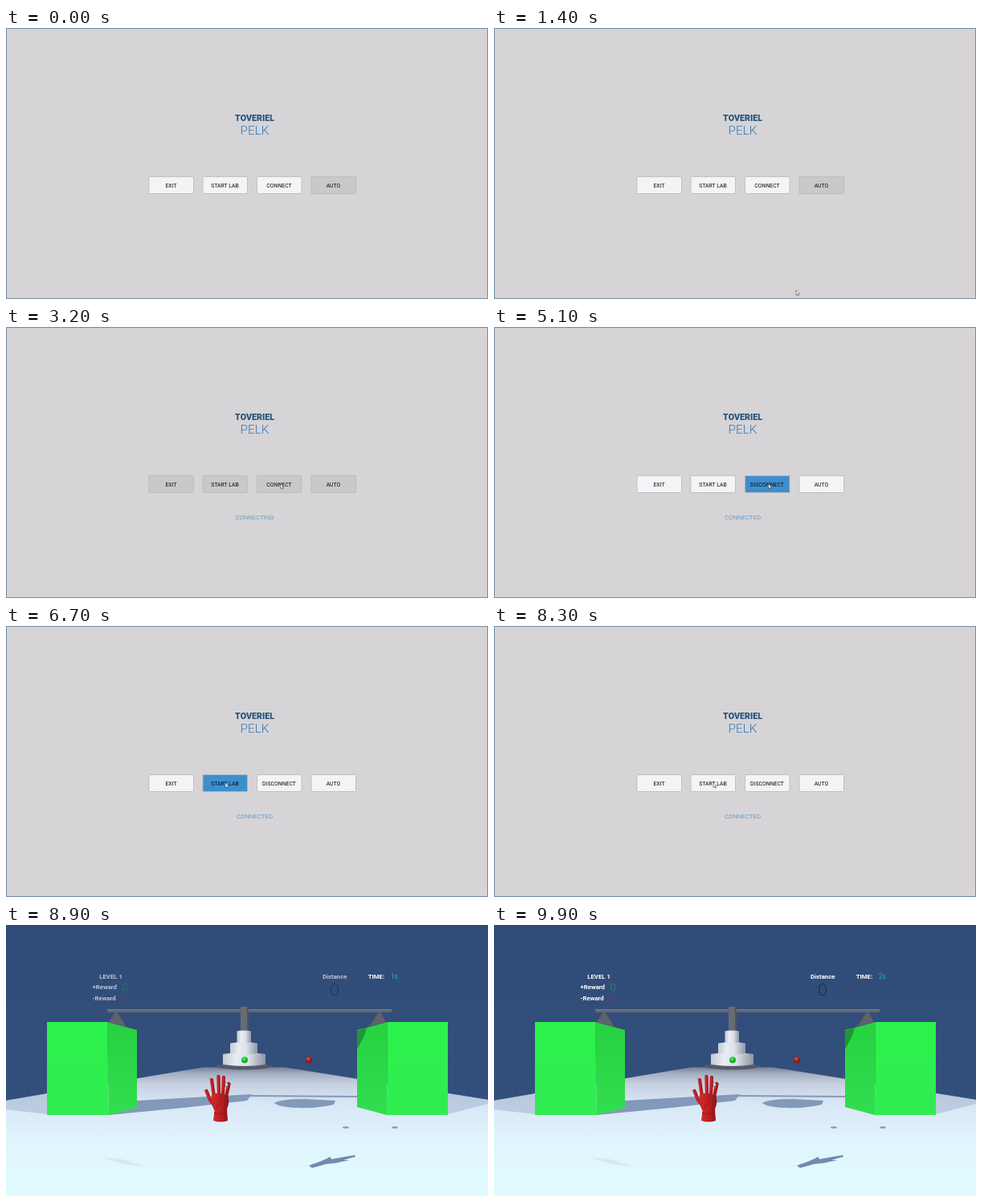
These frames come from a looping animation (600x338 px, 10000 ms). An HTML page:

```html
<!DOCTYPE html>
<html lang="en">
<head>
<meta charset="utf-8">
<title>Virtual lab</title>
<style>
html, body { margin: 0; height: 100%; overflow: hidden; background: #d6d4d6; }
svg { display: block; width: 100vw; height: 100vh; }
text { font-family: Roboto, Arial, sans-serif; }
.mid { text-anchor: middle; }
.button { font-size: 6.9px; fill: #0c0c0e; }
.label { font-size: 7.75px; font-weight: 700; fill: #fff; }
.thin { font-size: 13px; font-weight: 100; }
</style>
</head>
<body>
<svg viewBox="0 0 600 338">
  <defs>
    <linearGradient id="sky" x2="0" y2="1">
      <stop stop-color="#304b78"/><stop offset="1" stop-color="#34527f"/>
    </linearGradient>
    <linearGradient id="floor" gradientUnits="userSpaceOnUse" x1="0" y1="177" x2="0" y2="338">
      <stop stop-color="#727d96"/><stop offset=".05" stop-color="#a3adc0"/>
      <stop offset=".13" stop-color="#c6d0e0"/><stop offset=".28" stop-color="#d8e6f5"/>
      <stop offset=".55" stop-color="#e0f4fd"/><stop offset="1" stop-color="#e0fbff"/>
    </linearGradient>
    <linearGradient id="drum">
      <stop stop-color="#c3c9d3"/><stop offset=".3" stop-color="#e9edf2"/>
      <stop offset=".6" stop-color="#dde1e8"/><stop offset="1" stop-color="#8f96a4"/>
    </linearGradient>
    <linearGradient id="front" x2="0" y2="1">
      <stop stop-color="#2cf24c"/><stop offset="1" stop-color="#30ec52"/>
    </linearGradient>
    <linearGradient id="side" x2="0" y2="1">
      <stop stop-color="#27d140"/><stop offset="1" stop-color="#31de50"/>
    </linearGradient>
    <linearGradient id="skin">
      <stop stop-color="#d02a2c"/><stop offset=".5" stop-color="#bd1f23"/><stop offset="1" stop-color="#8c1218"/>
    </linearGradient>
    <radialGradient id="green" cx=".4" cy=".3"><stop stop-color="#3dff60"/><stop offset="1" stop-color="#0fae2c"/></radialGradient>
    <radialGradient id="red" cx=".4" cy=".3"><stop stop-color="#f04a40"/><stop offset="1" stop-color="#8e1414"/></radialGradient>
  </defs>

  <g id="menu">
    <rect width="600" height="338" fill="#d6d4d6"/>
    <rect x=".5" y=".5" width="599" height="337" fill="none" stroke="#7189a8"/>
    <g class="mid">
      <text x="309.5" y="115.6" font-size="10.7" font-weight="800" fill="#24527a">TOVERIEL</text>
      <text x="309.5" y="132.6" font-size="15.4" font-weight="300" fill="#3478b6">PELK</text>
      <g id="buttons"></g>
      <text id="status" x="309.6" y="240.2" font-size="7.75" font-weight="300" fill="#3a80c0"></text>
    </g>
  </g>

  <g id="scene">
    <rect width="600" height="338" fill="url(#sky)"/>
    <path d="M0 219L245 177.500H347L600 218V338H0Z" fill="url(#floor)"/>
    <path d="M0 219L51 210V236L0 230ZM550 210L600 218V223L550 236Z" fill="#a9bbd3" opacity=".6"/>
    <g fill="#8299b9">
      <path d="M128 237L163 219L306 211L300 219L230 227Z"/>
      <path d="M300 212L437 213V215L300 214Z"/>
      <path d="M334 222Q342 217 372 217L410 219L408 224Q388 229 362 228Q340 227 334 222Z"/>
      <ellipse cx="423" cy="252.500" rx="4" ry="1.200"/>
      <ellipse cx="484" cy="252.500" rx="4" ry="1.200"/>
    </g>
    <path d="M377 300L391 295L400 291L403 289L405 292L434 287L435 289L420 293L428 293L410 297L399 298L381 303Z" fill="#7089ad"/>
    <path d="M118 290L145 292L172 301L150 299Z" fill="#cfe0f0" opacity=".6"/>

    <ellipse cx="296" cy="176.500" rx="35" ry="4" fill="#555a66"/>
    <g fill="url(#drum)">
      <path d="M270 161Q296.500 157 323 161V174Q296.500 178 270 174Z"/>
      <path d="M279 147.500Q296 144 313 147.500V160Q296 163 279 160Z"/>
      <path d="M287.500 132.500Q296 130 305 132.500V146Q296 148.500 287.500 146Z"/>
    </g>
    <path d="M126 105H480V109H126Z" fill="#65676e"/>
    <path d="M126 105H480V106.300H126Z" fill="#777981"/>
    <path d="M292 102H300V131.500H292Z" fill="#696b72"/>
    <path d="M300 102L302 103V131H300Z" fill="#50525a"/>
    <path d="M137 107L128 121.500L150 127ZM465 107L451 126L473 121.500Z" fill="#5f626c"/>
    <path d="M137 107L147 121.500L150 127ZM465 107L456 122L451 126Z" fill="#4b4e59"/>

    <path d="M126 121L163 131V228L128 237Z" fill="url(#side)"/>
    <path d="M51 121H126L128 237H51Z" fill="url(#front)"/>
    <path d="M475 121L437 131V227L474 237Z" fill="url(#side)"/>
    <path d="M475 121H550V237H474Z" fill="url(#front)"/>
    <path d="M437 132L449 128L446 138L437 155Z" fill="#1c9636"/>
    <circle cx="297" cy="168.300" r="4" fill="url(#green)"/>
    <circle cx="377" cy="168.300" r="4" fill="url(#red)"/>

    <g fill="none" stroke-linecap="round" stroke-linejoin="round">
      <g stroke="#a91a1f" stroke-width="4.200">
        <path d="M259 214L256 193M265 212L264.500 189M270 212L271 190M274 215L277.500 198"/>
        <path d="M260 226L254 218L249.500 207"/>
      </g>
      <path d="M258.500 214L255.300 193M264.300 212L263.800 189M269.500 212L270.400 190M259 224L253 217L249 207" stroke="#cb2a2c" stroke-width="1.600"/>
    </g>
    <path d="M256 212Q266 207 276 213Q279 220 275 230L276 244Q267 247 258 244L259.500 232Q255 222 256 212Z" fill="url(#skin)"/>
    <path d="M259 234Q267 237 275 233M267 216Q266 224 262 229" fill="none" stroke="#8c1218" stroke-width=".8"/>

    <g id="hud">
      <text class="label" x="116.300" y="66.700">LEVEL 1</text>
      <text class="label" x="107.600" y="80.100">+Reward</text>
      <text class="label" x="107.600" y="94.400">-Reward</text>
      <text class="label" x="394" y="66.700">Distance</text>
      <text class="thin mid" x="148" y="82.300" fill="#20e040">0</text>
      <text class="thin mid" x="148" y="96.300" fill="#e02a2a">0</text>
      <text class="thin mid" x="409" y="88" style="font-size:21px" fill="#0a0f18">0</text>
    </g>
    <text class="label" x="450.700" y="66.700">TIME:</text>
    <text id="clock" x="478.800" y="66.900" font-size="8.500" fill="#25a8dc"></text>
  </g>

  <path id="cursor" d="M0 0V6L1.400 4.800L2.300 6.800L3.300 6.300L2.500 4.400H4.300Z" fill="#fff" stroke="#333" stroke-width=".55"/>
</svg>

<script>
const LOOP = 10000;
const IDLE = [244, 244, 246], HOVER = [61, 143, 204], OFF = [201, 200, 202];
const $ = id => document.getElementById(id);
const ramp = (t, a, b) => Math.min(1, Math.max(0, (t - a) / (b - a)));
const ease = x => x * x * (3 - 2 * x);
const mix = (a, b, k) => a.map((v, i) => v + (b[i] - v) * k);

// Keys are [start, end, value]; each one fades on from the value before it.
const track = (t, first, keys) =>
  keys.reduce((v, [a, b, to, f = x => x]) => mix(v, to, f(ramp(t, a, b))), first);

const buttons = [
  { x: 178, label: 'EXIT', from: IDLE, keys: [[2400, 2700, OFF], [4650, 4850, IDLE]] },
  { x: 245, label: 'START LAB', from: IDLE, keys: [[2400, 2700, OFF], [4650, 4850, IDLE], [6330, 6480, HOVER], [7550, 7850, IDLE]] },
  { x: 312.5, label: 'CONNECT', from: IDLE, keys: [[2050, 2200, HOVER], [2350, 2700, OFF], [4650, 4850, HOVER], [5550, 5700, IDLE]] },
  { x: 380, label: 'AUTO', from: OFF, keys: [[4650, 4850, IDLE]] }
];
$('buttons').innerHTML = buttons.map(b =>
  `<rect x="${b.x}" y="185.500" width="55.500" height="21" rx="1" stroke="#b8b8bc" stroke-width=".8"/>
   <text class="button" x="${b.x + 27.5}" y="198.500">${b.label}</text>`).join('');
const boxes = $('buttons').querySelectorAll('rect');
const labels = $('buttons').querySelectorAll('text');

const path = [
  [1000, 1300, [377, 331]],
  [1300, 2300, [341.5, 195.5], ease],
  [5350, 5800, [350, 242], ease],
  [5800, 6650, [273, 195.5], ease]
];

function draw(t) {
  const inLab = t >= 8400, connected = t >= 4700;
  $('menu').style.display = inLab ? 'none' : '';
  $('scene').style.display = inLab ? '' : 'none';
  buttons.forEach((b, i) => boxes[i].setAttribute('fill', `rgb(${track(t, b.from, b.keys).map(Math.round)})`));
  labels[2].textContent = connected ? 'DISCONNECT' : 'CONNECT';
  $('status').textContent = connected ? 'CONNECTED' : 'CONNECTING';
  $('status').style.opacity = ramp(t, 2450, 2800);
  $('cursor').setAttribute('transform', `translate(${track(t, [374, 340], path)})`);
  $('hud').style.opacity = 0.12 + 0.88 * ramp(t, 8400, 9200);
  $('clock').textContent = (t < 8900 ? 0 : t < 9900 ? 1 : 2) + 's';
}

function frame(now) {
  draw(Math.floor(now % LOOP / 100) * 100);
  requestAnimationFrame(frame);
}
draw(0);
requestAnimationFrame(frame);
</script>
</body>
</html>
```
